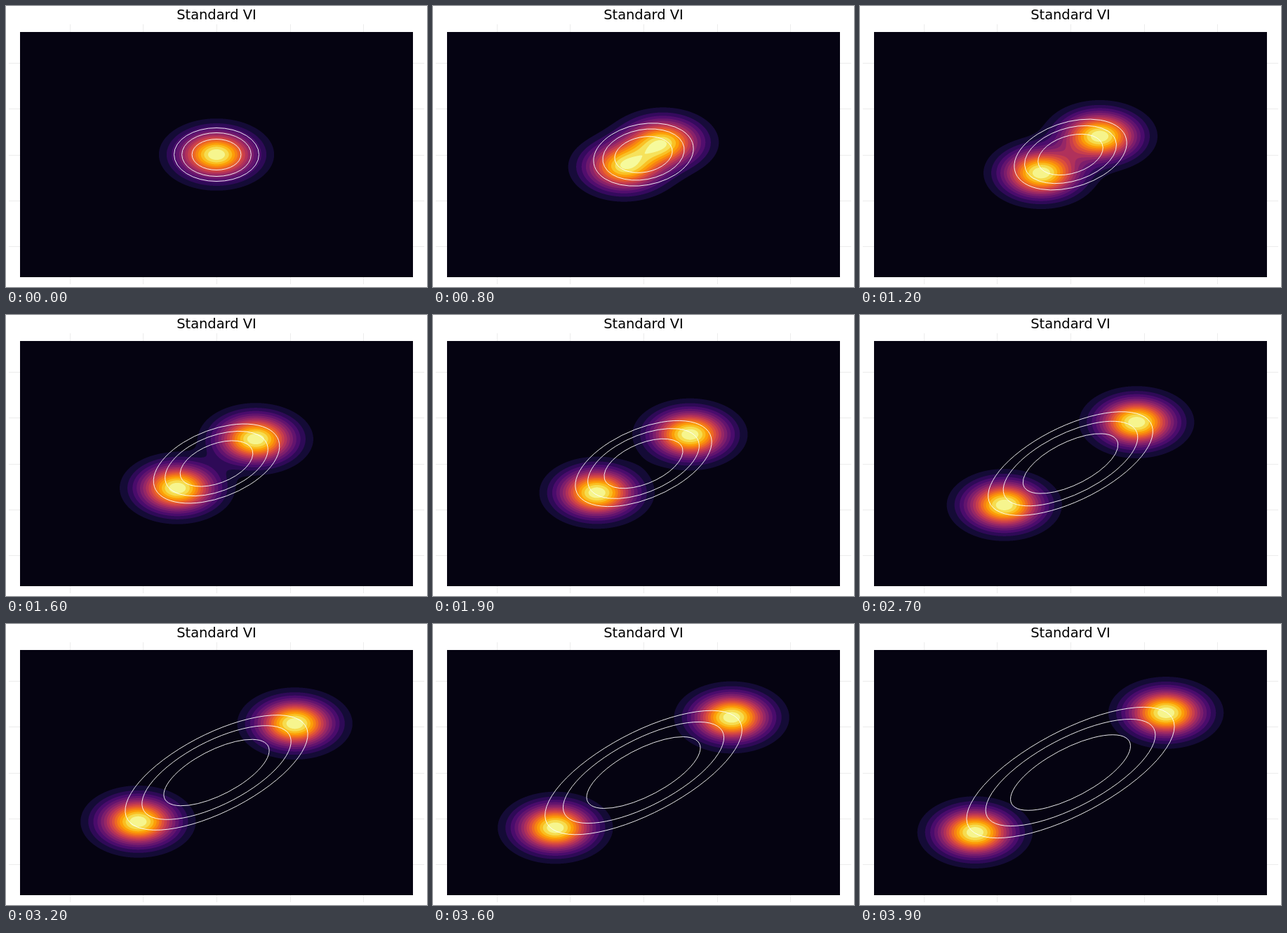
Animation of 600 by 400 pixels, one loop 4 s. Source, as an HTML page with a canvas:

```html
<!DOCTYPE html>
<html lang="en">
<head>
<meta charset="utf-8">
<title>Standard VI</title>
<style>
  html, body { margin: 0; width: 600px; height: 400px; overflow: hidden; background: #fff; }
  canvas, svg { position: absolute; left: 0; top: 0; display: block; }
  text { font: 19.44px "DejaVu Sans", sans-serif; text-anchor: middle; }
  ellipse { fill: none; stroke: #fff; stroke-width: 0.9px; vector-effect: non-scaling-stroke; }
</style>
</head>
<body>
<canvas id="field" width="600" height="400"></canvas>
<svg width="600" height="400" viewBox="0 0 600 400">
  <text x="300" y="19">Standard VI</text>
  <g id="fit" transform="translate(300 211.5) scale(34.9 -21.95) rotate(45)">
    <ellipse/><ellipse/><ellipse/>
  </g>
</svg>
<script>
const STEP_MS = 100, STEPS = 40;
const CX = 300, CY = 211.5, SX = 34.9, SY = 21.82; // centre and pixels per unit
const BOX = { x: 20, y: 37, w: 560, h: 349 };
const SUB = 3; // samples per pixel side

const ctx = document.getElementById('field').getContext('2d');
const rings = [...document.querySelectorAll('#fit ellipse')];
const image = ctx.createImageData(BOX.w, BOX.h);

// Evenly spaced key colours, joined by a smooth spline
const KEYS = '000004 160b39 420a68 6a176e 932667 bc3754 dd513a f37819 fca50a f6d746 f6fca0'
  .split(' ').map(hex => [0, 2, 4].map(i => parseInt(hex.slice(i, i + 2), 16)));

function ramp(p) {
  const last = KEYS.length - 1, pos = Math.min(1, p) * last;
  const i = Math.min(last - 1, Math.floor(pos)), u = pos - i;
  const key = n => KEYS[Math.max(0, Math.min(last, n))];
  return [0, 1, 2].map(c => {
    const [a, b, e, f] = [i - 1, i, i + 1, i + 2].map(n => key(n)[c]);
    return b + u / 2 * (e - a + u * (2 * a - 5 * b + 4 * e - f + u * (3 * (b - e) + f - a)));
  });
}

// Height of the highest point of the two-bump mixture
function peak(d) {
  const D = d * Math.SQRT2;
  let s = D;
  for (let i = 0; i < 200; i++) s = D * Math.tanh(s * D);
  const bump = z => Math.exp(-z * z / 2);
  return (bump(s - D) + bump(s + D)) / (4 * Math.PI);
}

function bell(n, start, centre, scale, mean) {
  return Float64Array.from({ length: n * SUB }, (_, i) => {
    const z = (start + (i + 0.5) / SUB - centre) / scale - mean;
    return Math.exp(-z * z / 2);
  });
}

// Filled contours at a round level step, at most 16 bands up to the peak
function drawField(d) {
  const top = peak(d);
  const step = [0.005, 0.006, 0.008, 0.01].find(s => s >= top / 16);
  const bands = Array.from({ length: 17 }, (_, i) => ramp((i + 0.5) * step / top));
  const norm = 1 / (4 * Math.PI * step);
  const xa = bell(BOX.w, BOX.x, CX, SX, d), xb = bell(BOX.w, BOX.x, CX, SX, -d);
  const ya = bell(BOX.h, BOX.y, CY, -SY, d), yb = bell(BOX.h, BOX.y, CY, -SY, -d);
  const px = image.data, count = SUB * SUB;
  let o = 0;
  for (let y = 0; y < BOX.h; y++) {
    for (let x = 0; x < BOX.w; x++) {
      let r = 0, g = 0, b = 0;
      for (let j = y * SUB; j < (y + 1) * SUB; j++) {
        const va = ya[j] * norm, vb = yb[j] * norm;
        for (let i = x * SUB; i < (x + 1) * SUB; i++) {
          const c = bands[Math.floor(xa[i] * va + xb[i] * vb)];
          r += c[0]; g += c[1]; b += c[2];
        }
      }
      px[o++] = r / count;
      px[o++] = g / count;
      px[o++] = b / count;
      px[o++] = 255;
    }
  }
  ctx.putImageData(image, BOX.x, BOX.y);
}

// The fitted Gaussian widens and tilts as the bumps move apart
function drawFit(d) {
  const sd = 1 + Math.hypot(0.245, 0.43 * d) - 0.245;
  const rho = 0.8 * d * d / (d * d + 2.1);
  rings.forEach((ring, i) => {
    const r = sd * Math.sqrt(i + 1);
    ring.setAttribute('rx', r * Math.sqrt(1 + rho));
    ring.setAttribute('ry', r * Math.sqrt(1 - rho));
  });
}

function drawGrid() {
  ctx.fillStyle = '#ececec';
  for (let v = -6; v <= 6; v += 3) {
    ctx.fillRect(Math.round(CX + v * SX), 26, 1, 370);
    ctx.fillRect(4, Math.round(CY + v * SY), 592, 1);
  }
}

let shown = -1;
function render(ms) {
  const k = Math.floor(ms / STEP_MS) % STEPS;
  if (k === shown) return;
  shown = k;
  drawField(k / 10);
  drawFit(k / 10);
}

const begin = performance.now();
function tick() {
  render(performance.now() - begin);
  requestAnimationFrame(tick);
}
drawGrid();
tick();
</script>
</body>
</html>
```
